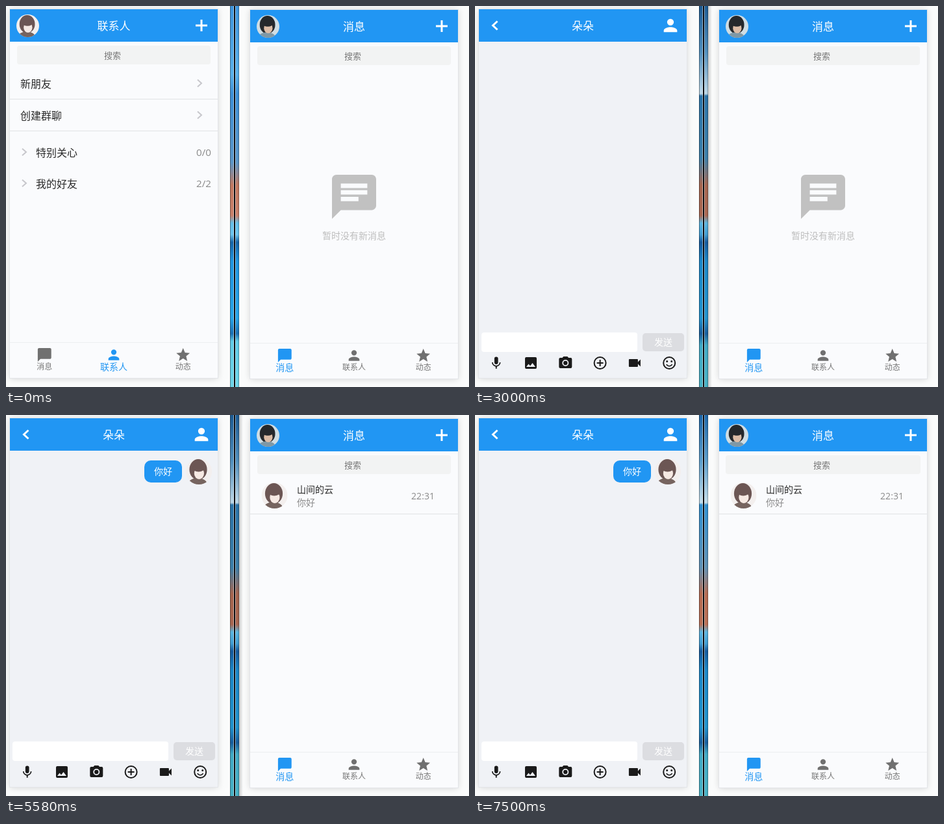
These frames come from a looping animation (713x587 px, 8 s). An HTML page with a canvas:

```html
<!DOCTYPE html>
<html lang="zh">
<head>
<meta charset="utf-8">
<style>
html, body { margin: 0; width: 100%; height: 100%; overflow: hidden; }
canvas { display: block; }
</style>
</head>
<body>
<canvas id="stage" width="713" height="587"></canvas>
<script>
const ctx = document.getElementById('stage').getContext('2d');
const LOOP = 8000;
const BLUE = '#2196f3', GREY = '#8a8a8a', INK = '#2a2a2a', LINE = '#e1e3e5', PAGE = '#fafbfd';
const SANS = '"Open Sans", "Noto Sans CJK SC", "Noto Sans CJK", sans-serif';
const ARIAL = '"Liberation Sans", sans-serif';
const FIXED = '"Noto Sans Mono CJK SC", "Noto Sans CJK SC", monospace';
const FRIENDS = ['阿禾', '朵朵'], SENDER = '山间的云';

// Icons on a 24-unit grid
const ICON = {
  chat: 'M20 2H4c-1.1 0-2 .9-2 2v18l4-4h14c1.1 0 2-.9 2-2V4c0-1.1-.9-2-2-2z',
  lines: 'M6 6h12v2H6zM6 9h12v2H6zM6 12h8v2H6z',
  person: 'M12 12a4 4 0 1 0 0-8 4 4 0 0 0 0 8zm0 2c-2.67 0-8 1.34-8 4v2h16v-2c0-2.66-5.33-4-8-4z',
  star: 'M12 17.27L18.18 21l-1.64-7.03L22 9.24l-7.19-.61L12 2 9.19 8.63 2 9.24l5.46 4.73L5.82 21z',
  mic: 'M12 14a3 3 0 0 0 3-3V5a3 3 0 0 0-6 0v6a3 3 0 0 0 3 3zm5.3-3a5.3 5.1 0 0 1-10.6 0H5c0 3.4 2.7 6.2 6 6.7V21h2v-3.3c3.3-.5 6-3.3 6-6.7z',
  image: 'M21 19V5a2 2 0 0 0-2-2H5a2 2 0 0 0-2 2v14a2 2 0 0 0 2 2h14a2 2 0 0 0 2-2zM8.5 13.5l2.5 3 3.5-4.5 4.5 6H5z',
  camera: 'M9 2L7.2 4H4a2 2 0 0 0-2 2v12a2 2 0 0 0 2 2h16a2 2 0 0 0 2-2V6a2 2 0 0 0-2-2h-3.2L15 2zm3 15a5 5 0 1 1 0-10 5 5 0 0 1 0 10zm0-1.8a3.2 3.2 0 1 0 0-6.4 3.2 3.2 0 0 0 0 6.4z',
  add: 'M13 7h-2v4H7v2h4v4h2v-4h4v-2h-4zM12 2a10 10 0 1 0 0 20 10 10 0 0 0 0-20zm0 18a8 8 0 1 1 0-16 8 8 0 0 1 0 16z',
  video: 'M17 10.5V7a1 1 0 0 0-1-1H4a1 1 0 0 0-1 1v10a1 1 0 0 0 1 1h12a1 1 0 0 0 1-1v-3.5l4 4v-11z',
  smile: 'M12 2a10 10 0 1 0 0 20 10 10 0 0 0 0-20zm0 18a8 8 0 1 1 0-16 8 8 0 0 1 0 16zM15.5 8a1.5 1.5 0 1 0 0 3 1.5 1.5 0 0 0 0-3zM8.5 8a1.5 1.5 0 1 0 0 3 1.5 1.5 0 0 0 0-3zM6.9 14a5.5 5.5 0 0 0 10.2 0h-1.7a4 4 0 0 1-6.8 0z'
};
for (const k in ICON) ICON[k] = new Path2D(ICON[k]);

const FACES = {
  girl: { bg: '#f3efee', hair: '#6c5654', skin: '#f6e9e3', body: '#76645f' },
  dark: { bg: '#161917', hair: '#2c332c', skin: '#56604c', body: '#0c0e0d' },
  blue: { bg: '#cfdde4', hair: '#25282c', skin: '#dcbca6', body: '#7e98a6' }
};

// Desktop strip between the windows: [position, colour]
const LOWER = [[.57, '#58b4e0'], [.6, '#3f9cd2'], [.62, '#15599c'], [.67, '#1a86c6'], [.82, '#2092cc'], [.86, '#175c9c'], [.89, '#3fa9c4'], [1, '#46b0c4']];
const STRIP = {
  bright: [[0, '#3d94dc'], [.18, '#58b0ea'], [.23, '#3c8fd6'], [.41, '#5a96c8'], [.47, '#c07860'], [.55, '#c9806a'],
    [.57, '#62bde8'], [.6, '#6cc4ee'], [.62, '#1765a8'], [.67, '#1f95e0'], [.82, '#27a4e8'], [.86, '#1a6fb4'], [.88, '#5fcbe6'], [1, '#6cd4e8']],
  dim: [[0, '#1c5a92'], [.12, '#4f8ebc'], [.23, '#bcd6e6'], [.236, '#2a73a8'], [.4, '#3b7ea8'], [.47, '#a5644e'], [.55, '#a86650'], ...LOWER],
  mixed: [[0, '#1d66a8'], [.12, '#5a9cca'], [.23, '#c2dcea'], [.236, '#2f8fd0'], [.4, '#5e90b4'], [.47, '#b56a50'], [.55, '#b86e54'], ...LOWER]
};

// Pinyin keystrokes: start time, text, candidates
const KEYS = [
  [3060, 'n', ['你', '呢', '能', '年', '那']],
  [3180, 'ni', ['你', '呢', '泥', '拟', '逆']],
  [3300, "ni'h", ['你好', '你会', '你还', '年后', '你和']],
  [3480, "ni'ha", ['你好', '你还', '你哈', '拟好', '你海']],
  [3600, "ni'hao", ['你好', '你号', '拟好', '倪好', '字符画：你好']]
];
const COMMIT = 3960, SEND = 5100;
const CARET_ON = [[2520, 3000], [COMMIT, 4440], [4920, 5580], [6060, 6300]];

const within = (t, a, b) => t >= a && t < b;

function rect(x, y, w, h, color, r = 0) {
  ctx.fillStyle = color;
  ctx.beginPath();
  ctx.roundRect(x, y, w, h, r);
  ctx.fill();
}

// cy is the middle of the glyphs
function text(s, x, cy, size, color, align = 'left', font = SANS) {
  ctx.font = `${size}px ${font}`;
  ctx.textAlign = align;
  ctx.fillStyle = color;
  ctx.fillText(s, x, cy + size * .38);
}

function icon(name, cx, cy, size, color) {
  ctx.save();
  ctx.translate(cx - size / 2, cy - size / 2);
  ctx.scale(size / 24, size / 24);
  ctx.fillStyle = color;
  ctx.fill(ICON[name], 'evenodd');
  ctx.restore();
}

function chevron(cx, cy, w, h, color, width, turn = 0) {
  ctx.save();
  ctx.translate(cx, cy);
  ctx.rotate(turn);
  ctx.beginPath();
  ctx.moveTo(-w / 2, -h / 2);
  ctx.lineTo(w / 2, 0);
  ctx.lineTo(-w / 2, h / 2);
  ctx.strokeStyle = color;
  ctx.lineWidth = width;
  ctx.stroke();
  ctx.restore();
}

function avatar(kind, x, y, r) {
  const c = FACES[kind];
  const oval = (cx, cy, rx, ry, color) => {
    ctx.fillStyle = color;
    ctx.beginPath();
    ctx.ellipse(cx, cy, rx, ry, 0, 0, 7);
    ctx.fill();
  };
  ctx.save();
  ctx.translate(x, y);
  ctx.scale(r, r);
  ctx.beginPath();
  ctx.arc(0, 0, 1, 0, 7);
  ctx.clip();
  rect(-1, -1, 2, 2, c.bg);
  oval(-.05, -.15, .68, .8, c.hair);
  oval(-.1, 1, .75, .5, c.body);
  oval(.02, .15, .38, .45, c.skin);
  oval(-.02, -.28, .46, .3, c.hair);
  ctx.restore();
}

function header(title) {
  rect(6, 5, 320, 50, BLUE);
  text(title, 166, 31, 17, '#fff', 'center');
}

function panel(color) {
  ctx.save();
  ctx.shadowColor = 'rgba(0,0,0,.16)';
  ctx.shadowBlur = 10;
  rect(6, 5, 320, 569, color);
  ctx.restore();
  ctx.strokeStyle = '#e3e5e8';
  ctx.lineWidth = 1;
  ctx.strokeRect(5.5, 4.5, 321, 569);
}

function home(title, face, active, grow = 0) {
  panel(PAGE);
  header(title);
  avatar(face, 33.5, 30.5, 17.5);
  rect(292, 28.5, 18, 3, '#fff');
  rect(299.5, 21, 3, 18, '#fff');
  rect(17 - grow, 61, 298 + 2 * grow, 29, '#f2f3f3', 4);
  text('搜索', 164, 76, 13, '#777', 'center');
  rect(6, 518, 320, 1, '#eceef0');
  [['chat', '消息'], ['person', '联系人'], ['star', '动态']].forEach(([name, label], i) => {
    const x = 59.3 + i * 106.7, on = i === active;
    icon(name, x, 537.5, 25, on ? BLUE : '#707070');
    text(label, x, on ? 556 : 555.5, on ? 14 : 12, on ? BLUE : '#777', 'center');
  });
}

function contacts(open) {
  home('联系人', 'girl', 1);
  ['新朋友', '创建群聊'].forEach((s, i) => {
    text(s, 22, 119.5 + i * 49, 16, INK);
    chevron(298, 119 + i * 49, 6, 11, '#c7c7cc', 2);
    rect(6, 143 + i * 49, 320, 1, LINE);
  });
  [['特别关心', '0/0', 0], ['我的好友', '2/2', open]].forEach(([s, n, turn], i) => {
    const y = 225 + i * 48;
    chevron(28, y, 6, 10.5, '#c7c7cc', 2, turn * Math.PI / 2);
    text(s, 46, y + .5, 16, INK);
    text(n, 316, y, 15.2, GREY, 'right');
  });
  if (!open) return;
  ctx.save();
  ctx.beginPath();
  ctx.rect(6, 297, 320, 134 * open);
  ctx.clip();
  FRIENDS.forEach((name, i) => {
    const y = 297 + i * 67;
    rect(6, y, 320, 67, '#fff');
    rect(6, y + 66, 320, 1, LINE);
    avatar(i ? 'blue' : 'dark', 41, y + 33, 20);
    text(name, 71, y + 23.5, 14, '#000');
    text('[手机在线]', 71, y + 44, 14, GREY);
  });
  ctx.restore();
}

function chat(t) {
  const ready = within(t, COMMIT, SEND);
  panel('#f0f2f6');
  header(FRIENDS[1]);
  chevron(31, 30, 7, 13, '#fff', 3, Math.PI);
  icon('person', 301, 30, 31, '#fff');
  if (t >= SEND) {
    rect(213, 70, 58, 34, BLUE, 10);
    text('你好', 242, 87, 14, '#fff', 'center');
    avatar('girl', 297, 87, 20);
  }
  rect(10, 503, 240, 30, '#fff', 4);
  rect(258, 504, 64, 28, ready ? BLUE : '#dcdde1', 5);
  text('发送', 290, 518, 14, '#fff', 'center');
  ['mic', 'image', 'camera', 'add', 'video', 'smile'].forEach((name, i) =>
    icon(name, 32.7 + i * 53.3, 550, name === 'mic' ? 23 : 24, '#1a1a1a'));
  if (ready) text('你好', 10, 519, 14, '#000');
  if (CARET_ON.some(([a, b]) => within(t, a, b))) rect(ready ? 38 : 10, 509, 1, 19, '#000');
}

function inputMethod(t) {
  const [, typed, words] = KEYS.filter(k => t >= k[0]).pop();
  text(typed, 10, 518.5, 14.3, '#000');
  const end = 10 + Math.round(ctx.measureText(typed).width);
  rect(10, 526, end - 10, 1, '#000');
  rect(end, 509, 1, 19, '#000');

  const x = end + 2;
  rect(x, 527, 400, 70, '#f9fafb');
  ctx.strokeStyle = '#3f97dd';
  ctx.lineWidth = 1;
  ctx.strokeRect(x + .5, 527.5, 399, 70);
  text(typed, x + 16, 544.5, 15.7, '#555', 'left', ARIAL);
  rect(x + 17 + Math.round(ctx.measureText(typed).width), 536, 1, 17, BLUE);
  [[371.5, '#d4d6d8', -1], [384, '#4a9fe6', 1]].forEach(([dx, color, way]) => {
    ctx.fillStyle = color;
    ctx.beginPath();
    ctx.moveTo(x + dx + 3 * way, 543);
    ctx.lineTo(x + dx - 2 * way, 538);
    ctx.lineTo(x + dx - 2 * way, 548);
    ctx.fill();
  });
  rect(x + 8, 559, 384, 1, '#d2d4d6');
  let left = x + 15;
  words.forEach((word, i) => {
    const color = i ? '#555' : BLUE;
    text(i + 1 + '.', left, 574, 16, color, 'left', FIXED);
    text(word, left + 16, 574, 16, color, 'left', FIXED);
    left += 26 + 16 * word.length;
  });
}

function messages(t) {
  home('消息', 'blue', 0, t >= 7500 ? 1 : 0);
  if (t < SEND + 60) {
    icon('chat', 166, 293, 81.6, '#c1c1c1');
    icon('lines', 166, 293, 81.6, PAGE);
    text('暂时没有新消息', 166, 353, 14, '#bdbdbd', 'center');
    return;
  }
  avatar('girl', 43.5, 123, 20);
  text(SENDER, 78, 113.5, 14, INK);
  text('你好', 78, 134, 14, GREY);
  text('22:31', 290, 124, 14.1, GREY, 'right');
  rect(6, 151, 320, 1, LINE);
}

function strip(t) {
  const dim = within(t, 720, 6300);
  const g = ctx.createLinearGradient(0, 0, 0, 587);
  STRIP[t < 720 ? 'bright' : dim ? 'dim' : 'mixed'].forEach(([p, c]) => g.addColorStop(p, c));
  rect(345, 0, 14, 587, g);
  rect(345, 0, 1, 587, 'rgba(0,0,0,.4)');
  rect(358, 0, 1, 587, 'rgba(0,0,0,.3)');
  rect(350, 0, 4, 587, 'rgba(255,255,255,.45)');
  rect(351, 0, 2, 587, '#0a0c10');
  if (dim) {
    const s = ctx.createLinearGradient(359, 0, 365, 0);
    s.addColorStop(0, 'rgba(0,0,0,.2)');
    s.addColorStop(1, 'rgba(0,0,0,0)');
    rect(359, 0, 6, 587, s);
  }
}

function draw(t) {
  rect(0, 0, 713, 587, '#fbfcfc');
  const p = Math.min(1, Math.max(0, Math.floor((t - 840) / 60) / 6));
  if (t < 1800) contacts(p * p * (3 - 2 * p));
  else chat(t);
  ctx.save();
  ctx.translate(370, 1);
  messages(t);
  ctx.restore();
  strip(t);
  if (within(t, KEYS[0][0], COMMIT)) inputMethod(t);
}

const start = performance.now();
function tick() {
  draw((performance.now() - start) % LOOP);
  requestAnimationFrame(tick);
}
tick();
</script>
</body>
</html>
```
